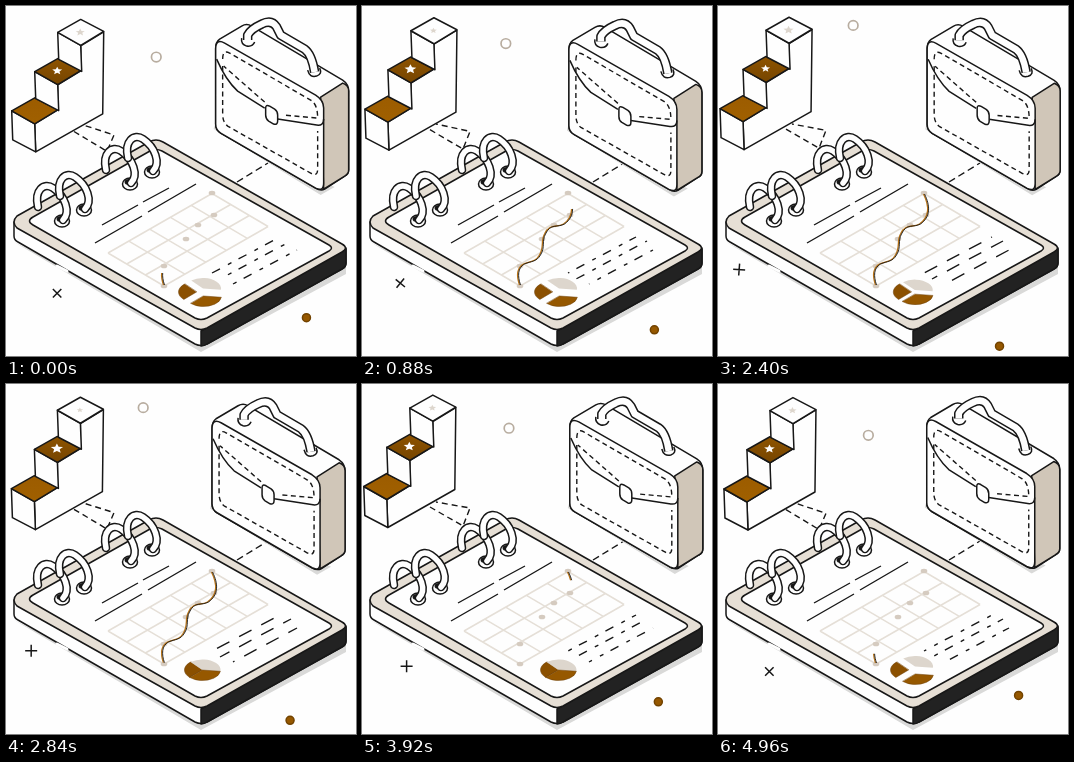
These frames come from a looping animation (350 by 350 pixels, 5000 ms). An HTML page with a canvas:

```html
<!DOCTYPE html>
<html lang="en">
<head>
<meta charset="utf-8">
<style>
html, body { margin: 0; width: 100%; height: 100%; overflow: hidden; background: #fefefe; }
canvas { display: block; width: 100vw; height: 100vh; }
</style>
</head>
<body>
<canvas width="350" height="350"></canvas>
<script>
const ctx = document.querySelector('canvas').getContext('2d');
const LOOP = 5000, INK = '#171717', BROWN = '#965800', BEIGE = '#ddd6cd', WHITE = '#fefefe', SHADE = '#d9d9d8';

const CHART = 'M158 279 C155 270 155 262 162 258 C169 255 174 256 178 249 C183 241 179 235 183 228 C188 217 195 222 202 218 C212 211 212 200 206 188';
const measure = document.createElementNS('http://www.w3.org/2000/svg', 'path');
measure.setAttribute('d', CHART);
const chartLength = measure.getTotalLength();

const wave = (t, period, trough) => (1 - Math.cos((t - trough) / period * 2 * Math.PI)) / 2;
const ease = (t, from, to) => {
  const p = Math.min(1, Math.max(0, (t - from) / (to - from)));
  return p * p * (3 - 2 * p);
};

function shape(d, fill, stroke, width = 1.5, dash = [], offset = 0) {
  const path = new Path2D(d);
  if (fill) { ctx.fillStyle = fill; ctx.fill(path); }
  if (stroke) {
    ctx.strokeStyle = stroke;
    ctx.lineWidth = width;
    ctx.setLineDash(dash);
    ctx.lineDashOffset = offset;
    ctx.stroke(path);
    ctx.setLineDash([]);
  }
}

function at(x, y, draw) {
  ctx.save();
  ctx.translate(x, y);
  draw();
  ctx.restore();
}

function oval(x, y, rx, ry, fill, stroke, width = 1.5) {
  ctx.beginPath();
  ctx.ellipse(x, y, rx, ry, 0, 0, 2 * Math.PI);
  if (fill) { ctx.fillStyle = fill; ctx.fill(); }
  if (stroke) { ctx.strokeStyle = stroke; ctx.lineWidth = width; ctx.stroke(); }
}

function tube(d, width) {
  shape(d, null, INK, width);
  shape(d, null, WHITE, width - 3);
}

function star(x, y, r, fill) {
  ctx.beginPath();
  for (let i = 0; i < 10; i++) {
    const a = i * Math.PI / 5 - Math.PI / 2, k = i % 2 ? r * 0.45 : r;
    ctx.lineTo(x + Math.cos(a) * k, y + Math.sin(a) * k * 0.8);
  }
  ctx.closePath();
  ctx.fillStyle = fill;
  ctx.fill();
}

function notebook() {
  shape('M8 236 L195 346 L340 268 V255 L195 330Z', SHADE);
  shape('M8 216 V230 Q8 234 12 236 L189 338 Q195 341 201 338 L336 263 Q340 261 340 257 V242Z', WHITE, INK);
  shape('M195 325 L340 243 V257 Q340 261 336 263 L201 338 Q198 340 195 340Z', '#222', INK);
  shape('M11 210 L143 136 Q150 132 157 136 L336 238 Q343 242 336 246 L201 322 Q195 325 189 322 L11 222 Q5 216 11 210Z', '#e6dfd5', INK);
  shape('M27 211 L144 145 Q150 142 156 145 L323 239 Q328 242 323 245 L201 312 Q195 315 189 312 L27 219 Q20 215 27 211Z', WHITE, INK);
  shape('M51 260 L61 265', null, WHITE, 3);
}

function rings() {
  for (const [x, y] of [[0, 0], [22, -11], [68, -37], [90, -49]]) {
    at(x, y, () => {
      oval(56, 215, 7.5, 6, WHITE, INK);
      oval(55, 213, 4.5, 3, INK);
      tube('M32 201 C28 184 38 176 47 182 C59 190 65 206 57 214', 8.5);
    });
  }
}

// Maps grid cells to the slanted page.
const cell = (i, j) => [102 + 20.8 * i + 18.7 * j, 247 - 11.9 * i + 11 * j];

function grid() {
  let d = '';
  for (let i = 0; i <= 5; i++) d += `M${cell(i, 0)}L${cell(i, 3)}`;
  for (let j = 0; j <= 3; j++) d += `M${cell(0, j)}L${cell(5, j)}`;
  shape(d, null, '#e5dfd7', 1.5);
}

function chart(t) {
  grid();
  for (const [x, y] of [[158, 280], [158, 260], [180, 233], [192, 219], [208, 209], [206, 187]]) {
    oval(x, y, 3.3, 2.3, '#d5cbc0');
  }
  const drawn = ease(t < 2500 ? t + LOOP : t, 4700, 6230);
  const from = t < 4400 ? ease(t, 2800, 4150) : 0;
  const to = t < 2500 || t > 4400 ? drawn : 1;
  if (to - from < 0.005) return;
  const dash = [(to - from) * chartLength, chartLength * 2];
  ctx.lineCap = 'butt';
  at(-0.5, 0, () => shape(CHART, null, '#b87316', 1.3, dash, -from * chartLength));
  at(0.5, 0, () => shape(CHART, null, INK, 0.9, dash, -from * chartLength));
  ctx.lineCap = 'round';
}

function pie(t) {
  const open = 1 - ease(t, 1950, 2900) + ease(t, 4150, 4850);
  const slices = [
    [2.35, 4, -6, 0, '#8b5000'],
    [4, 6.4, 0.5, -3.5, BEIGE],
    [0.12, 2.35, 1, 4, BROWN]
  ];
  for (const [a, b, dx, dy, fill] of slices) {
    const x = 196.5 + dx * open, y = 286 + dy * open;
    ctx.beginPath();
    ctx.moveTo(x, y);
    ctx.ellipse(x, y, 18, 10.5, 0, a, b);
    ctx.closePath();
    ctx.fillStyle = fill;
    ctx.fill();
    ctx.strokeStyle = '#6c410a';
    ctx.lineWidth = 0.5;
    if (fill !== BEIGE) ctx.stroke();
  }
}

function notes(t) {
  shape('M96 219 L132 199 M137 196 L163 182 M89 237 L136 210 M142 206 L190 178', null, INK, 1.4);
  const long = ease(t, 1900, 2350) - ease(t, 3400, 3900);
  const dash = [9 + 5 * long, 9 + 2 * long, 4 + 10 * long, 8 + 3 * long];
  ['M206 267 L274 231', 'M214 273 L285 235', 'M227 278 L291 244'].forEach((line, i) =>
    shape(line, null, INK, 1.4, dash, i * 9 - t / LOOP * 54));
}

function stairs(t) {
  const k = wave(t, LOOP / 3, 610), pulse = wave(t, 1000, 230), rise = 39.2;
  shape(`M68 ${123 + 3 * k} L101 ${142 + 4 * k} L108 ${124 + 6 * k} L74 118`, null, INK, 1.4, [6, 4]);
  at(-4.2 + 4.7 * k, -2.5 + 2.8 * k, () => {
    shape('M29 118 L52 104 V79 L75 65 V40 L98 26 L97 108 L30 146Z', WHITE, INK);
    for (let i = 0; i < 3; i++) {
      at(i * 23, -i * rise, () => {
        shape(`M6 105 L29 118 L30 ${i ? 144 : 146} L7 ${i ? 132 : 134}Z`, WHITE, INK);
        const tone = ctx.createLinearGradient(0, 93, 0, 118);
        tone.addColorStop(0, i ? '#8d5300' : '#9c5c00');
        tone.addColorStop(1, i ? '#764500' : '#a06000');
        shape('M6 105 L29 92 L52 104 L29 118Z', i < 2 ? tone : WHITE, INK);
      });
    }
    star(51.5, 65, 4 + 2.8 * pulse, WHITE);
    star(74.5, 26.5, 6.2 - 3.2 * pulse, BEIGE);
  });
}

function briefcase(t) {
  const q = wave(t, 1000, 190);
  at(1 - 7.5 * q, -1 + 3.5 * q, () => {
    shape('M209 123 L316 189 L330 181 L319 176 L212 112Z', SHADE);
    shape('M215 33 L237 20 Q242 17 247 20 L338 74 Q344 78 344 85 V164 Q344 168 340 170 L320 183 Q316 185 311 182 L216 127 Q211 124 211 118 V42 Q211 36 215 33Z', WHITE, INK);
    shape('M316 91 L338 77 Q344 79 344 85 V164 Q344 168 340 170 L319 183Z', '#d0c6b8', INK);
    shape('M211 43 Q211 32 220 37 L311 89 Q319 94 319 102 V177 Q319 186 311 182 L216 127 Q211 124 211 118Z', WHITE, INK);
    shape('M218 60 V108 Q218 116 223 120 L306 167 Q313 171 313 163 V125', null, INK, 1.4, [5, 3.5]);
    shape('M218 53 Q218 43 225 47 L306 94 Q313 98 313 112 L279 109 M260 96 L219 60', null, INK, 1.4, [5, 3.5]);
    shape('M212 53 Q221 74 233 85 L260 102 M273 113 L312 119 Q319 120 319 113', null, INK);
    shape('M261 102 Q261 98 265 100 L270 103 Q273 105 273 109 V115 Q273 119 269 118 L264 115 Q261 113 261 109Z', WHITE, INK);
    tube('M243 34 L243 29 Q246 23 257 18 Q267 13 272 21 L276 29 L300 43 Q307 48 310 66', 9.5);
    shape('M237 32 Q236 38 242 40 Q248 41 250 36 M303 64 Q305 72 312 70 Q318 68 315 62', null, INK);
  });
}

function floaters(t) {
  const u = wave(t, LOOP, -270);
  oval(150.7 - 15.7 * u, 52 - 33 * u, 4.8, 4.8, null, '#b8ada0', 1.7);
  oval(301 - 19.7 * u, 310.8 + 29.7 * u, 4, 4, BROWN, '#724300');
  const turn = 45 * (1 - ease(t, 300, 2900) + ease(t, 3900, 5000));
  at(52 - 31.2 * u, 288 - 24.7 * u, () => {
    ctx.rotate(turn * Math.PI / 180);
    shape('M-6 0 H6 M0 -6 V6', null, INK, 1.5);
  });
}

function frame(now) {
  const t = now % LOOP;
  ctx.fillStyle = WHITE;
  ctx.fillRect(0, 0, 350, 350);
  ctx.lineCap = ctx.lineJoin = 'round';
  notebook();
  ctx.lineCap = 'butt';
  notes(t);
  chart(t);
  pie(t);
  ctx.lineCap = 'butt';
  shape('M231 176 L262 157', null, INK, 1.4, [7, 4]);
  stairs(t);
  ctx.lineCap = 'round';
  rings();
  ctx.lineCap = 'butt';
  briefcase(t);
  floaters(t);
}

const start = performance.now();
function tick() {
  frame(performance.now() - start);
  requestAnimationFrame(tick);
}
tick();
</script>
</body>
</html>
```
